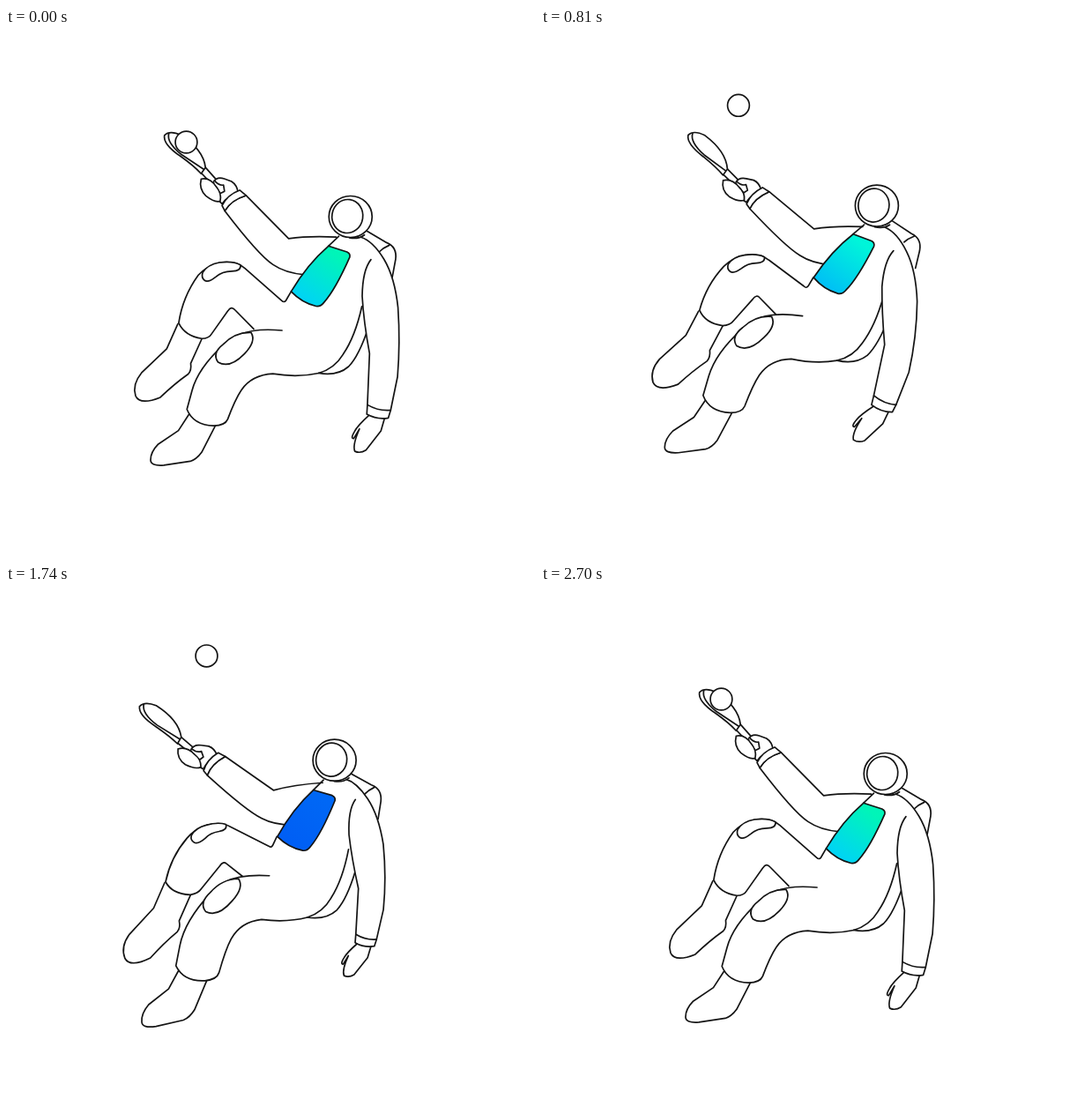
Animation, 600 px wide and 600 px high, one loop 2730 ms. Source, as an HTML page with a canvas:

```html
<!DOCTYPE html>
<html lang="en">
<head>
<meta charset="utf-8">
<title>Floating astronaut</title>
<style>
html, body { margin: 0; height: 100%; overflow: hidden; background: #fff; }
canvas { display: block; }
</style>
</head>
<body>
<canvas width="600" height="600"></canvas>
<script>
const ctx = document.querySelector('canvas').getContext('2d');
const SPAN = 2700, HOLD = 30, BOUNCES = 4;

// Joints of the drawn pose
const REST = {
  head: [389, 213], waist: [319, 304], hip: [313, 341], belly: [354, 392],
  elbow: [322, 237], neck: [227, 160], tip: [184, 120],
  kneeA: [267, 268], footA: [146, 414], kneeB: [280, 345], footB: [162, 487],
  crook: [411, 372], hand: [393, 487]
};

const TORSO = 'head waist hip belly', LEG_A = 'head waist hip kneeA footA', LEG_B = 'head hip belly kneeB footB',
  RACKET_ARM = 'head elbow neck tip', FREE_ARM = 'head crook hand';
const PANEL = 'M367 247 L388 254 Q392 256 391 260 Q374 297 361 311 Q357 316 352 315 Q336 311 324 298 Q343 267 367 247 Z';

const SHAPES = [
  // backpack
  [TORSO, 'M410 230 L433 244 Q445 249 443 263 L439 283 M436 247 Q429 250 425 254'],
  [TORSO, 'M411 340 Q400 372 388 384 Q375 395 354 391 M404 316 Q396 350 382 370 Q372 386 354 391'],
  // far leg
  [LEG_A, 'M195 333 L182 361 L153 388 Q142 401 146 414 Q151 425 174 416 Q190 401 206 390 Q210 386 209 378 L224 346'],
  [LEG_A, 'M324 298 L318 308 Q316 311 313 308 L272 271 Q262 262 244 264 Q228 268 219 278 Q201 302 196 332 Q203 347 222 350 Q230 350 233 345 L252 319 Q256 313 260 318 L281 340'],
  [LEG_A, 'M224 275 Q230 266 243 264 Q258 262 267 267 Q268 274 257 274 Q246 274 239 280 Q230 287 226 284 Q222 281 224 275'],
  // near leg and belly
  [LEG_B, 'M206 436 L194 454 L171 469 Q162 478 162 487 Q162 494 177 493 L207 489 Q214 487 220 479 L237 447'],
  [LEG_B, 'M313 342 Q294 340 280 342 Q262 344 246 358 Q217 384 210 409 L204 430 Q211 448 234 449 Q247 449 250 442 Q259 419 266 409 Q278 392 302 391 Q330 396 354 391'],
  [LEG_B, 'M240 377 Q233 367 246 357 Q260 343 278 344 Q284 354 270 368 Q253 385 240 377'],
  // racket
  [RACKET_ARM, 'M225 163 L237 176 L243 172 L230 157'],
  [RACKET_ARM, 'M184 120 Q190 114 203 120 Q228 137 230 157 L225 164 Q217 155 202 144 Q182 130 184 120 M189 118 Q186 128 203 142 L228 159'],
  // arm holding it
  [RACKET_ARM, 'M376 237 Q345 235 322 238 L275 189 Q258 194 251 206 Q288 256 304 267 Q318 277 340 279'],
  [RACKET_ARM, 'M239 173 Q243 167 251 170 L259 173 Q265 177 266 185 Q254 190 248 198 L242 192 L247 184'],
  [RACKET_ARM, 'M225 170 Q222 181 230 189 Q240 197 246 195 Q248 186 242 179 Q235 168 225 170'],
  [RACKET_ARM, 'M240 172 Q245 178 250 177 L251 184 L247 186'],
  [RACKET_ARM, 'M248 200 Q254 188 268 183 L275 189 Q258 194 251 206 Z'],
  // free arm
  [FREE_ARM, 'M409 444 Q395 456 391 463 Q386 471 390 471 L397 460 Q388 479 391 486 Q397 489 404 485 L422 463 L427 447'],
  [FREE_ARM, 'M415 264 Q405 276 404 306 Q405 335 411 372 L407 432 L406 443 Q418 450 431 448 L434 439 L443 400 Q447 360 445 320 Q442 285 430 264 Q418 243 404 238'],
  [FREE_ARM, 'M407 432 Q420 440 434 439'],
  // collar and panel
  [TORSO, 'M367 247 L379 236 M391 238 Q401 240 408 235'],
  [TORSO, PANEL, 'panel']
];

// Slow drift: one crest per period, at the given time
const wave = (t, mean, swing, crest, period = SPAN) =>
  mean + swing * Math.cos(2 * Math.PI * (t - crest) / period);

// Skeleton at time t; height is how far the ball is above the racket, 0 to 1
function poseAt(t, height) {
  const [x, y] = REST.head;
  const joints = { head: [x + wave(t, -11.5, 10.2, 130), y + wave(t, -9.5, 9.5, 0)] };
  const lean = wave(t, -0.5, 2.7, 720);
  const reach = wave(t, 1.035, 0.07, 1170, SPAN / 3);
  const fold = wave(t, 0.935, 0.07, 450);
  const sag = 15 * height, recoil = 9 * (1 - (1 - height) ** 4);

  function place(name, parent, degrees = lean, stretch = 1, drop = 0) {
    const dx = REST[name][0] - REST[parent][0], dy = REST[name][1] - REST[parent][1];
    const c = stretch * Math.cos(degrees * Math.PI / 180), s = stretch * Math.sin(degrees * Math.PI / 180);
    joints[name] = [joints[parent][0] + c * dx - s * dy, joints[parent][1] + s * dx + c * dy + drop];
  }
  for (const name of ['waist', 'hip', 'belly', 'kneeB']) place(name, 'head');
  for (const name of ['kneeA', 'footA', 'footB']) place(name, 'head', lean, 1, sag);
  place('elbow', 'head', lean, 1, sag / 2);
  place('neck', 'elbow', lean - recoil, reach);
  place('tip', 'neck');
  place('crook', 'head', lean * 1.6, (1 + fold) / 2);
  place('hand', 'crook', wave(t, 1.8, 6.5, 900), fold);
  return joints;
}

// Moving least squares: bends a point of the drawn pose along with its joints
function warp(x, y, bones) {
  let sum = 0, px = 0, py = 0, qx = 0, qy = 0, a = 0, b = 0, m = 0;
  const weighted = bones.map(([p, q]) => [p, q, 1 / ((x - p[0]) ** 2 + (y - p[1]) ** 2 + 0.1) ** 2]);
  for (const [p, q, w] of weighted) {
    sum += w;
    px += w * p[0]; py += w * p[1];
    qx += w * q[0]; qy += w * q[1];
  }
  px /= sum; py /= sum; qx /= sum; qy /= sum;
  for (const [p, q, w] of weighted) {
    const ux = p[0] - px, uy = p[1] - py, vx = q[0] - qx, vy = q[1] - qy;
    a += w * (ux * vx + uy * vy);
    b += w * (ux * vy - uy * vx);
    m += w * (ux * ux + uy * uy);
  }
  x -= px; y -= py;
  return [qx + (a * x - b * y) / m, qy + (b * x + a * y) / m];
}

function ellipse(x, y, rx, ry, tilt = 0) {
  ctx.beginPath();
  ctx.ellipse(x, y, rx, ry, tilt, 0, 2 * Math.PI);
  ctx.fill();
  ctx.stroke();
}

function panelFill(t, [x, y]) {
  const hue = wave(t, 186, -29, 330);
  const g = ctx.createLinearGradient(x - 12, y + 45, x - 50, y + 96);
  g.addColorStop(0, `hsl(${hue} 100% 48%)`);
  g.addColorStop(1, `hsl(${hue + (220 - hue) * 0.42} 100% 48%)`);
  return g;
}

function draw() {
  const t = Math.min(SPAN, Math.floor(performance.now() % (SPAN + HOLD) / HOLD) * HOLD);
  const flight = t * BOUNCES / SPAN % 1, height = 4 * flight * (1 - flight);
  const joints = poseAt(t, height);
  const { head, neck, tip } = joints;

  ctx.fillStyle = '#fff';
  ctx.fillRect(0, 0, 600, 600);
  ctx.strokeStyle = '#141414';
  ctx.lineWidth = 1.7;
  ctx.lineCap = ctx.lineJoin = 'round';

  for (const [names, d, kind] of SHAPES) {
    const bones = names.split(' ').map(name => [REST[name], joints[name]]);
    const path = new Path2D(d.replace(/(\d+) (\d+)/g, (_, x, y) => warp(+x, +y, bones).join(' ')));
    ctx.fillStyle = kind ? panelFill(t, head) : '#fff';
    ctx.fill(path);
    ctx.stroke(path);
  }

  ctx.fillStyle = '#fff';
  ellipse(head[0] + 3.5, head[1] + 1, 24.5, 23.5);
  ellipse(head[0], head[1] + 0.5, 17.5, 19, 0.15);
  ellipse((neck[0] + tip[0]) / 2 + 3 + 52 * height, (neck[1] + tip[1]) / 2 - 12 - 66 * height, 12.4, 12.4);
  requestAnimationFrame(draw);
}
draw();
</script>
</body>
</html>
```
